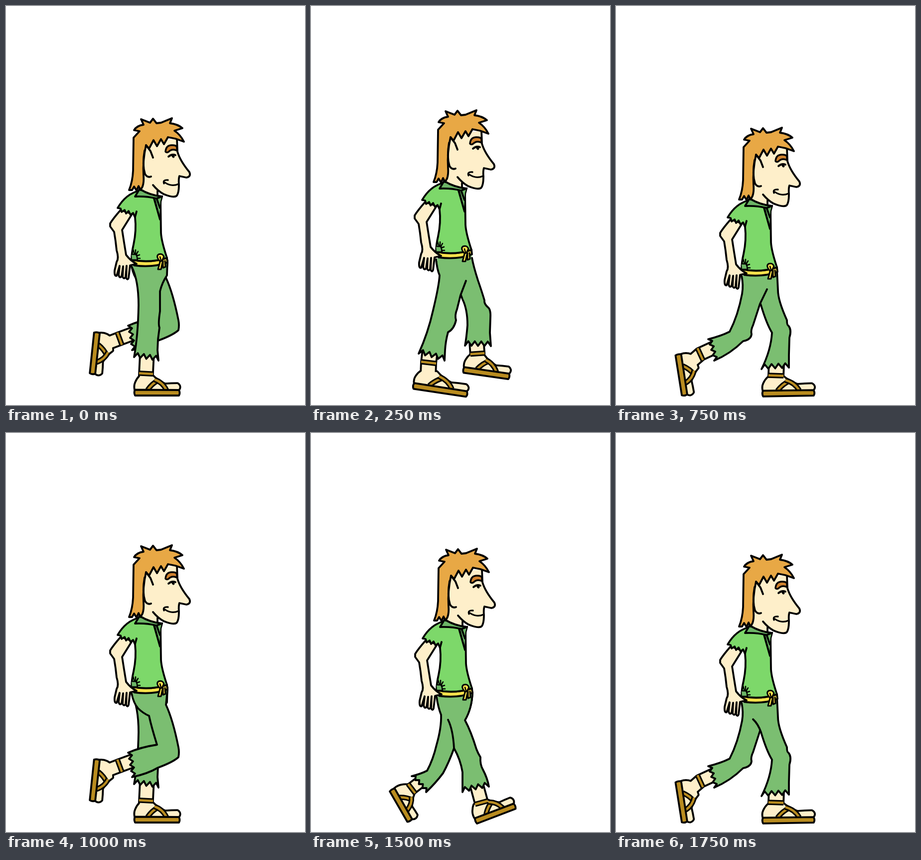
Write an HTML page with a canvas that moves like this. It is 600x800 px and loops after 2000 ms.

```html
<!DOCTYPE html>
<html lang="en">
<head>
<meta charset="utf-8">
<title>Walk cycle</title>
<style>
  html, body { margin: 0; width: 100%; height: 100%; overflow: hidden; background: #fff; }
  canvas { display: block; }
</style>
</head>
<body>
<canvas id="stage" width="600" height="800"></canvas>
<script>
const ctx = document.getElementById('stage').getContext('2d');
const STEP = 250, LINE = 3.8;
const SKIN = '#feefca', HAIR = '#e8a845', BROW = '#d0832f', SHIRT = '#7dd86a',
      DARK = '#6cb566', PANTS = '#7bbe71', LEATHER = '#b98c1f', ROPE = '#fae14c';

function shape(d, fill, width = LINE) {
  const path = new Path2D(d);
  if (fill) { ctx.fillStyle = fill; ctx.fill(path); }
  if (width) { ctx.strokeStyle = '#000'; ctx.lineWidth = width; ctx.stroke(path); }
}

function line(d, color, width, cap = 'round') {
  ctx.lineCap = cap;
  ctx.strokeStyle = color;
  ctx.lineWidth = width;
  ctx.stroke(new Path2D(d));
  ctx.lineCap = 'round';
}

function strap(d) {
  line(d, '#000', 10.5, 'butt');
  line(d, LEATHER, 4.5, 'butt');
}

// Ragged cloth edge from one point to another
function hem(x1, y1, x2, y2, depth = 9) {
  const dx = x2 - x1, dy = y2 - y1, len = Math.hypot(dx, dy);
  let d = '';
  for (let i = 1; i < 8; i++) {
    const k = i / 8, inset = i % 2 ? depth : 0;
    d += `L${x1 + dx * k + dy / len * inset} ${y1 + dy * k - dx / len * inset}`;
  }
  return d + `L${x2} ${y2}`;
}

const FOOT = 'M12 -38Q8 -34 5 -27Q2 -20 4 -12L89 -12Q95 -19 88 -24Q76 -24 63 -23Q47 -30 37 -41Z';
const SOLE = 'M3 -12.5L91 -12Q94 -6 91 -1L3 -1Q0 -7 3 -12.5Z';
const STRAPS = ['M28 -12Q37 -25 49 -31', 'M42 -33Q58 -28 66 -12'];

// x, y: heel; bx, by: ankle band; tx, ty: where the shin enters the trousers
function foot([x, y, degrees, length, bx, by, tx, ty]) {
  const matrix = new DOMMatrix().translate(x, y).rotate(degrees).scale(length, 1);
  const place = d => {
    const path = new Path2D();
    path.addPath(new Path2D(d), matrix);
    return path;
  };
  const ankle = matrix.transformPoint(new DOMPoint(24, -28));
  const shin = `M${ankle.x} ${ankle.y}L${bx} ${by}L${tx} ${ty}`;
  const body = place(FOOT), width = 24 * Math.min(length, 1.1);

  line(shin, '#000', width + 2 * LINE);
  shape(body, null, 2 * LINE);
  line(shin, SKIN, width);
  shape(body, SKIN, 0);
  STRAPS.forEach(d => strap(place(d)));
  shape(place(SOLE), LEATHER);

  const k = (width / 2 + 2) / Math.hypot(tx - bx, ty - by);
  const nx = (by - ty) * k, ny = (tx - bx) * k;
  strap(`M${bx - nx} ${by - ny}L${bx + nx} ${by + ny}`);
}

function leg({ shoe, cloth }) {
  foot(shoe);
  shape(cloth, PANTS);
}

const poses = [
  { dx: 0, dy: 0,
    rear: { shoe: [256, 782, 0, 1, 281, 737, 283, 695],
      cloth: 'M252 522Q266 550 266 600Q265 660 257 704' + hem(257, 704, 306, 711) +
        'L304 690L305 668L308 645Q305 638 309 612L309 572Q313 555 323 540L324 510' },
    front: { shoe: [176, 652, 96, .93, 228, 667, 255, 657],
      cloth: 'M252 522Q256 542 265 552Q275 562 287 567Q292 590 303 625Q270 630 245 641' +
        hem(245, 641, 253, 690, 7) +
        'Q285 683 305 671Q335 660 346 650Q348 640 346 630Q335 575 321 545L324 515' } },
  { dx: -1, dy: -16,
    rear: { shoe: [202, 768, 8.5, 1.21, 236, 715, 239, 690],
      cloth: 'M251 508Q253 528 258 540Q257 560 245 610Q235 655 216 697' + hem(216, 697, 268, 711) +
        'L269 690Q270 672 275 654Q287 648 291 630Q288 620 293 608L300 580L311 551' },
    front: { shoe: [303, 736, 8, 1.03, 334, 697, 332, 670],
      cloth: 'M278 558Q286 565 294 569Q300 575 304 588Q314 608 314 640Q312 665 309 681' +
        hem(309, 681, 361, 682) +
        'L359 655L360 625Q361 608 355 604Q347 597 348 590Q343 573 335 550Q326 522 323 505' } },
  { dx: 0, dy: 7,
    rear: { shoe: [156, 717, 60, .8, 202, 713, 215, 703],
      cloth: 'M252 529Q255 550 261 565Q262 590 252 625Q245 655 233 677Q222 683 202 688' +
        hem(202, 688, 231, 720, 6) +
        'Q250 702 265 682Q277 660 287 632Q302 602 309 575Q323 552 324 520' },
    front: { shoe: [331, 785, -21, .94, 342, 741, 333, 708],
      cloth: 'M275 575Q285 595 287 632Q300 655 304 680L304 720' + hem(304, 720, 357, 709) +
        'Q354 692 345 675Q339 665 340 650Q335 642 332 634Q321 598 309 576Q323 552 324 520' } },
  { dx: 0, dy: 19,
    rear: { shoe: [118, 698, 81, .92, 169, 698, 195, 686],
      cloth: 'M252 541Q256 560 253 577Q245 620 228 653Q210 662 185 668' +
        hem(185, 668, 197, 711, 7) +
        'Q230 697 255 672Q271 669 272 658Q270 650 275 640L289 597L303 568' },
    front: { shoe: [292, 784, -1, 1.15, 321, 741, 322, 715],
      cloth: 'M275 574Q285 583 291 600Q302 637 313 655Q311 690 292 728' + hem(292, 728, 347, 725) +
        'L347 700L348 665Q353 649 346 641Q343 640 343 630Q325 590 325 570L323 530' } }
];

function torso() {
  shape('M253 509Q290 516 323 505L324 514Q295 525 257 520Z', ROPE);
  shape('M230 409Q215 426 209 436L209 442L217 453Q220 470 222 490Q227 506 222 513' +
    'L218 530Q217 542 222 541L228 521L226 539Q228 547 232 542L235 522L234 543' +
    'Q237 549 240 543L242 521L241 545Q244 551 246 545L249 520L262 517' +
    'Q250 511 241 499Q237 475 233 449L253 417Z', SKIN);
  shape('M268 370Q240 377 224 405L230 406L232 413L238 409L241 416L246 411L250 419L255 415L259 424' +
    'Q262 450 256 478Q252 495 252 509Q290 516 323 505Q312 472 311 455L310 386Z', SHIRT);
  shape('M262 412L259 423');
  shape('M252 498L262 498L264 509L253 509', DARK, 2.5);
  shape('M255 488L258 498M260 489L260 497M265 492L261 499M268 499L262 501M269 506L263 506', null, 2.5);
  shape('M309 513L305 528L311 528L314 514M315 511L315 525L320 523L319 511', ROPE, 3);
  shape('M309 512Q300 502 306 498Q314 495 317 503L313 511Z', ROPE, 3);
  shape('M309 503L311 510', null, 2.5);
}

function head() {
  shape('M280 275L343 266L345 298L368 334Q371 343 361 344L347 341L347 370Q345 384 330 381' +
    'L305 372L305 386L268 372L274 340Z', SKIN, 0);
  shape('M343 266L344 292Q349 310 368 333Q372 342 362 344L348 341Q346 346 347 358' +
    'Q347 376 342 381Q335 385 316 377Q305 371 295 359M304 371L304 382');
  shape('M298 385L304 383L314 381L311 392L309 428Z', DARK, 2.5);
  shape('M297 386L309 428M303 388L309 405');
  shape('M268 367L259 382Q283 381 302 386L313 382Q290 380 268 367Z', DARK);
  shape('M247 369Q254 352 255 330L256 264L268 251L257 249Q262 240 276 238L271 227L289 234L295 226' +
    'L302 235L311 234L333 225L329 235Q345 237 354 245L338 250Q350 258 357 272L340 266L325 263' +
    'L317 277L311 267L303 281L296 269L287 286L281 279Q274 310 276 340Q277 354 274 362' +
    'L270 369L266 361L262 370L257 362L253 369Z', HAIR);
  shape('M281 279L290 291L295 304M278 290Q273 318 279 337Q284 345 291 342');
  shape('M320 292Q321 279 333 279Q342 279 343 283L343 290Q335 286 329 290Q323 296 320 292Z', BROW, 3.5);
  shape('M326 302Q333 296 340 299');
  shape('M335 301L336 302', null, 5);
  shape('M325 349Q314 348 317 356M319 354Q332 363 346 357', null, 3.3);
}

function draw(time) {
  const beat = Math.floor(time / STEP) % 8;
  const { dx, dy, rear, front } = poses[beat % 4];

  ctx.fillStyle = '#fff';
  ctx.fillRect(0, 0, 600, 800);
  ctx.lineJoin = ctx.lineCap = 'round';
  shape(`M252 ${522 + dy}L323 ${515 + dy}L309 ${565 + dy}L280 ${570 + dy}Z`, PANTS, 0);
  // The legs swap depth on every second half of the loop
  (beat < 4 ? [front, rear] : [rear, front]).forEach(leg);

  ctx.save();
  ctx.translate(dx, dy);
  torso();
  head();
  ctx.restore();
}

const start = performance.now();
function tick() {
  draw(performance.now() - start);
  requestAnimationFrame(tick);
}
tick();
</script>
</body>
</html>
```
